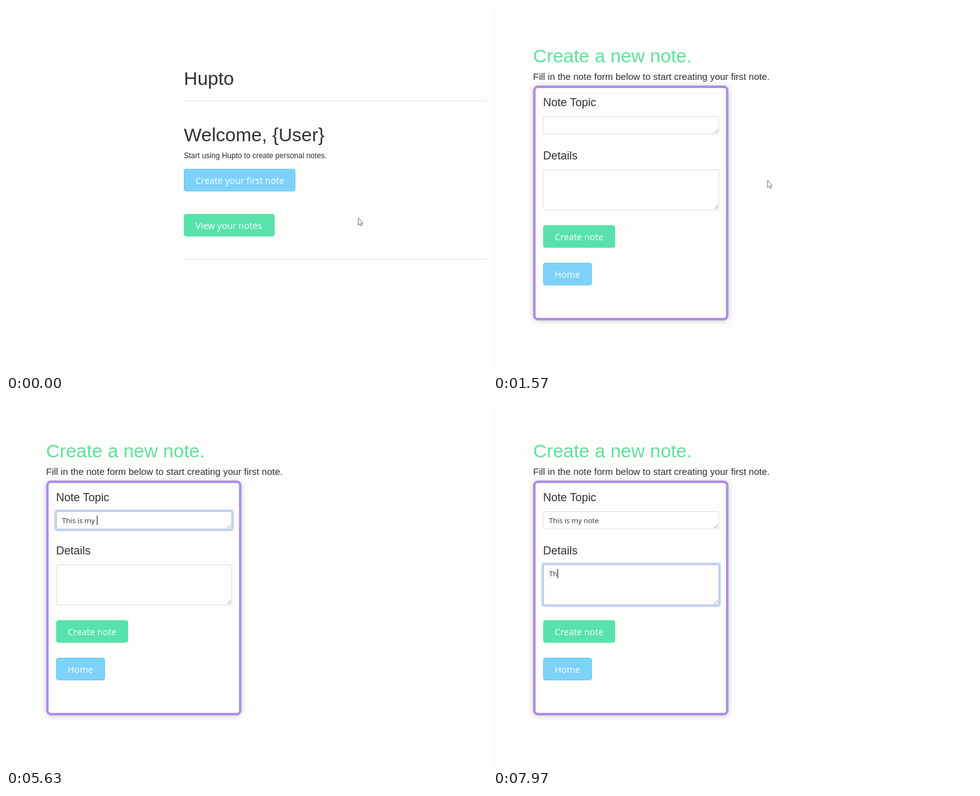
These frames come from a looping animation (768x586 px, 8 s). An HTML page:

```html
<!DOCTYPE html>
<html lang="en">
<head>
<meta charset="utf-8">
<title>Note form</title>
<style>
  html, body { margin: 0; width: 100%; height: 100%; overflow: hidden; background: #fdfdfc; }
  svg { display: block; width: 768px; height: 586px; }
  text { font-family: "Liberation Sans", Arial, sans-serif; fill: #303034; white-space: pre; }
  .h1 { font-size: 30px; }
  .h2 { font-size: 18px; }
  .lead { font-size: 15px; }
  .small { font-size: 12px; }
  .label { font: 14.3px "Open Sans", "Noto Sans", sans-serif; }
  .typed { font: 11.4px "Open Sans", "Noto Sans", sans-serif; }
  .blue { fill: #7dd2fa; stroke: #68c6f2; }
  .green { fill: #58e2ac; stroke: #58e2ac; }
  .blue + text, .green + text { fill: #fdfdfc; }
  .card { fill: #fdfdfc; stroke: #ae8dee; stroke-width: 4; filter: drop-shadow(0 1px 4px #cfcfc8); }
  .ring { fill: none; stroke: #cdd6f4; stroke-width: 4; }
  .edge { fill: #fdfdfc; stroke: #dcdfe0; }
  .focus { fill: none; stroke: #a9bfd4; }
  .grip { stroke: #a0a0a0; }
  .caret { fill: #222; }
  .cursor path { fill: #fdfdfc; stroke: #66666a; stroke-width: .9; stroke-linejoin: round; }
</style>
</head>
<body>
<svg id="stage" viewBox="0 0 768 586"></svg>
<script>
const LOOP = 8000, PAGE_AT = 1370, TOPIC_AT = 2600, DETAILS_AT = 7250;
const stage = document.getElementById('stage');

const text = (x, y, cls, str, extra = '') => `<text x="${x}" y="${y}" class="${cls}" ${extra}>${str}</text>`;
const rect = (x, y, w, h, cls, r = 3) =>
  `<rect x="${x}" y="${y}" width="${w}" height="${h}" rx="${r}" class="${cls}"/>`;
const button = (x, y, w, color, label) =>
  rect(x + .5, y + .5, w - 1, 35, color) + text(x + 18.5, y + 24, 'label', label);
const rule = (y, color) => `<path d="M284 ${y}H768" stroke="${color}"/>`;
const field = (id, y, h) => `<g id="${id}">
  ${rect(80.5, y + .5, 280, h, 'edge', 2)}
  <g class="glow">${rect(79, y - 1, 283, h + 3, 'ring')}${rect(80.5, y + .5, 280, h, 'focus', 2)}</g>
  <path class="grip" d="M353 ${y + h - 1}l6 -6M356.5 ${y + h - 1}l2.5 -2.5"/>
  ${text(89.5, y + 19, 'typed', '')}
  <rect class="caret" y="${y + 7}" width="1" height="15"/></g>`;

stage.innerHTML = `
<g id="home">
  ${text(284, 126, 'h1', 'Hupto')}
  ${rule(151.5, '#e8eaec')}
  ${text(284, 216, 'h1', 'Welcome, {User}')}
  ${text(284, 243, 'small', 'Start using Hupto to create personal notes.')}
  ${button(284, 260, 178, 'blue', 'Create your first note')}
  ${button(284, 332, 145, 'green', 'View your notes')}
  ${rule(404.5, '#e2e5e2')}
</g>
<g id="form">
  ${text(64, 90, 'h1', 'Create a new note.', 'style="fill:#5fe09a"')}
  ${text(64, 118, 'lead', 'Fill in the note form below to start creating your first note.')}
  ${rect(66, 129, 308, 371, 'card', 6)}
  ${text(80, 160, 'h2', 'Note Topic')}
  ${field('topic', 176, 28)}
  ${text(80, 245, 'h2', 'Details')}
  ${field('details', 261, 64)}
  ${button(80, 350, 115, 'green', 'Create note')}
  ${button(80, 410, 78, 'blue', 'Home')}
</g>
<g id="arrow" class="cursor"><path d="M.5 .5V12L3.2 9.5L5 13.5L6.6 12.7L4.9 8.8H8Z"/></g>
<g id="hand" class="cursor">
  <path d="M-1 1Q.3 -.8 1.5 1V6Q3 4.6 4 6.2Q5.3 5 6.2 6.7Q8 5.8 8 8V11L6.5 15H0L-3.8 9.5Q-4 7.4 -1 9Z"/>
</g>`;

const get = id => document.getElementById(id);
const clamp = v => Math.min(1, Math.max(0, v));
const show = (el, on) => el.setAttribute('visibility', on ? 'visible' : 'hidden');

// [time, x, y] stops of the pointer
const path = [[30, 562, 338], [830, 497, 332], [1070, 438, 278], [2000, 438, 278], [2560, 180, 190]];
// [time, text so far]
const topicKeys = [[TOPIC_AT, ''], [4070, 'T'], [4270, 'Th'], [4330, 'Thi'], [4400, 'This'], [4770, 'This '],
  [4830, 'This i'], [4900, 'This is'], [5170, 'This is '], [5270, 'This is m'], [5370, 'This is my'],
  [5600, 'This is my '], [5670, 'This is my n'], [5770, 'This is my no'], [6000, 'This is my note']];
const detailKeys = [[DETAILS_AT, ''], [7900, 'T'], [7970, 'Th']];

function pointerAt(t) {
  const i = path.findIndex(p => p[0] > t);
  if (i < 0) return path[path.length - 1].slice(1);
  const b = path[i], a = path[Math.max(0, i - 1)];
  const k = a === b ? 0 : (t - a[0]) / (b[0] - a[0]);
  const s = k * k * (3 - 2 * k);
  return [a[1] + (b[1] - a[1]) * s, a[2] + (b[2] - a[2]) * s];
}

function drawField(id, keys, t, from, to) {
  const [since, str] = keys.filter(k => k[0] <= t).pop() || [0, ''];
  const el = get(id), label = el.querySelector('text'), caret = el.querySelector('.caret');
  label.textContent = str;
  el.querySelector('.glow').style.opacity = clamp((t - from) / 150) - clamp((t - to) / 150);
  const blinkOn = (t - since) % 1060 < 530;
  caret.setAttribute('opacity', t >= from && t < to && blinkOn ? 1 : 0);
  caret.setAttribute('x', Math.round(89.5 + (str ? label.getComputedTextLength() : 0)));
}

function draw(t) {
  const onForm = t >= PAGE_AT;
  get('home').style.display = onForm ? 'none' : '';
  get('form').style.display = onForm ? '' : 'none';
  if (onForm) {
    drawField('topic', topicKeys, t, TOPIC_AT, DETAILS_AT);
    drawField('details', detailKeys, t, DETAILS_AT, LOOP + 1000);
  }
  const [x, y] = pointerAt(t);
  const overButton = !onForm && x < 462 && y > 260 && y < 296;
  for (const id of ['arrow', 'hand']) get(id).setAttribute('transform', `translate(${Math.round(x)} ${Math.round(y)})`);
  show(get('hand'), overButton);
  show(get('arrow'), !overButton && t < 2560);
}

const start = performance.now();
function tick() {
  draw((performance.now() - start) % LOOP);
  requestAnimationFrame(tick);
}
tick();
</script>
</body>
</html>
```
